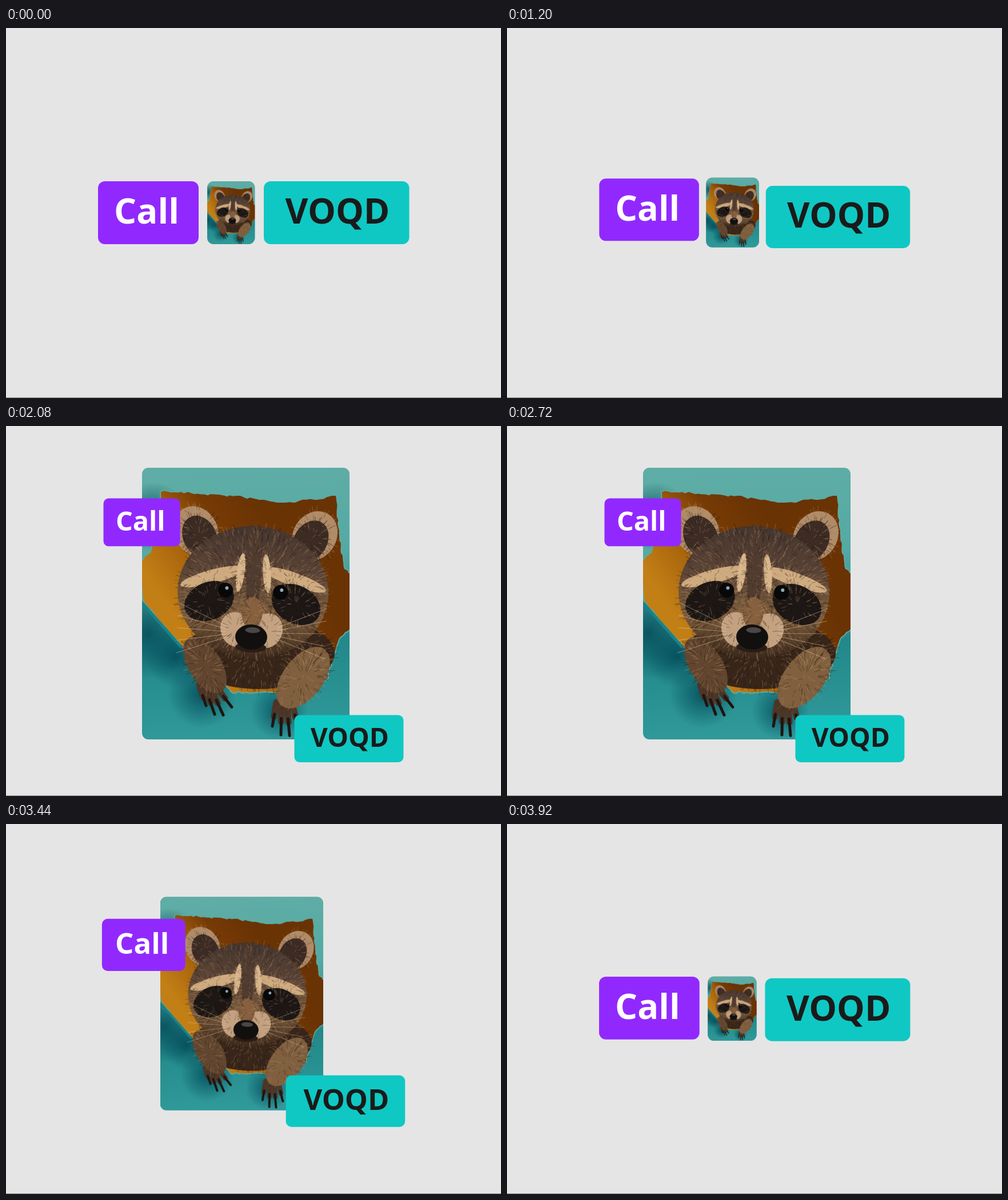
These frames come from a looping animation (866x647 px, 4000 ms). An HTML page with a canvas:

```html
<!DOCTYPE html>
<html lang="en">
<head>
<meta charset="utf-8">
<title>Call VOQD</title>
<style>
html, body { margin: 0; width: 100%; height: 100%; overflow: hidden; background: #e5e5e5; }
canvas { display: block; }
</style>
</head>
<body>
<canvas id="stage" width="866" height="647"></canvas>
<script>
const LOOP = 4000;
const stage = document.getElementById('stage').getContext('2d');
const photo = document.createElement('canvas');
photo.width = 363;
photo.height = 475;
const ctx = photo.getContext('2d');

const mix = (a, b, p) => a + (b - a) * p;
const clamp = v => Math.min(1, Math.max(0, v));
let seed = 7;
const random = () => (seed = seed * 16807 % 2147483647) / 2147483647;

// Opening ease: cubic-bezier(.65, 0, .35, 1)
function easeOpen(u) {
  let lo = 0, hi = 1;
  for (let i = 0; i < 24; i++) {
    const s = (lo + hi) / 2, r = 1 - s;
    if (1.95 * r * r * s + 1.05 * r * s * s + s ** 3 < u) lo = s; else hi = s;
  }
  return lo * lo * (3 - 2 * lo);
}
const easeClose = u => u < .5 ? 4 * u ** 3 : 1 - 4 * (1 - u) ** 3;
const progress = t => easeOpen(clamp((t - 1030) / 937)) - easeClose(clamp((t - 3016) / 1034));

function gradient(x0, y0, x1, y1, ...colors) {
  const g = ctx.createLinearGradient(x0, y0, x1, y1);
  colors.forEach((c, i) => g.addColorStop(i / (colors.length - 1), c));
  return g;
}

function shadow(x, y, r) {
  const g = ctx.createRadialGradient(x, y, 0, x, y, r);
  g.addColorStop(0, 'rgba(0,70,85,.8)');
  g.addColorStop(1, 'rgba(0,70,85,0)');
  oval(g, x, y, r, r);
}

function oval(fill, x, y, rx, ry, tilt = 0) {
  ctx.beginPath();
  ctx.ellipse(x, y, rx, ry, tilt, 0, 7);
  ctx.fillStyle = fill;
  ctx.fill();
}

function line(color, width, x0, y0, x1, y1) {
  ctx.beginPath();
  ctx.moveTo(x0, y0);
  ctx.lineTo(x1, y1);
  ctx.strokeStyle = color;
  ctx.lineWidth = width;
  ctx.stroke();
}

// Oval with hairs running outwards from its centre
function fur(color, x, y, rx, ry, tilt = 0) {
  const hairs = [color, color, '#1d120c', '#c29a70'];
  oval(color, x, y, rx, ry, tilt);
  ctx.save();
  ctx.translate(x, y);
  ctx.rotate(tilt);
  ctx.globalAlpha = .3;
  for (let i = 0; i < 60 + rx * ry / 10; i++) {
    const a = random() * 2 * Math.PI, r = Math.sqrt(random());
    const hx = Math.cos(a), hy = Math.sin(a), len = 4 + 8 * random();
    const px = hx * rx * r, py = hy * ry * r;
    line(hairs[i % 4], 1.3, px, py, px + hx * len, py + hy * len);
  }
  ctx.restore();
}

function tornHole(...corners) {
  ctx.beginPath();
  corners.forEach(([x, y], i) => {
    const [nx, ny] = corners[(i + 1) % corners.length];
    const steps = Math.ceil(Math.hypot(nx - x, ny - y) / 6);
    for (let k = 0; k < steps; k++) {
      ctx.lineTo(mix(x, nx, k / steps) + 3 * random() - 1, mix(y, ny, k / steps) + 4 * random() - 2);
    }
  });
  ctx.closePath();
  ctx.fillStyle = gradient(30, 220, 220, 90, '#c27f16', '#a8640b', '#763a05', '#6a3304');
  ctx.fill();
  ctx.strokeStyle = '#5fa9a2';
  ctx.lineWidth = 2;
  ctx.stroke();
}

function paw(x, y, tipX, tipY) {
  for (let i = 0; i < 4; i++) {
    const tx = tipX + 15 * i, ty = tipY + 18 * Math.sin(i);
    line('#4c3526', 11, x + 9 * i, y, mix(x + 9 * i, tx, .6), mix(y, ty, .6));
    line('#1d1512', 5, mix(x + 9 * i, tx, .5), mix(y, ty, .5), tx, ty);
  }
}

// Face coordinates start at the nose; each side is a mirror image
function eachSide(drawSide) {
  for (const side of [-1, 1]) {
    ctx.save();
    ctx.scale(side, 1);
    drawSide(side);
    ctx.restore();
  }
}

function drawFace() {
  eachSide(() => {
    fur('#b08b68', 104, -181, 38, 45, .5);
    fur('#3d2c24', 97, -172, 29, 38, .5);
  });
  fur(gradient(0, -198, 0, 38, '#43342d', '#574135', '#80603f', '#3b281b'), 0, -78, 132, 116);
  eachSide(() => {
    fur('#cfab80', 72, -103, 58, 12, .3);
    fur('#d9b78c', 23, -112, 7, 34, -.1);
    fur('#1d1715', 76, -60, 45, 33, .45);
    fur('#c4a281', 27, -12, 27, 31, .4);
  });
  fur('#513c30', 0, -110, 13, 78);
  fur('#87603f', 0, -42, 18, 28);
  oval('#2b1d16', 0, 18, 27, 9);
  oval('#12100f', 0, 0, 28, 22);
  oval('#4b4747', 2, -12, 13, 5);
  eachSide(side => {
    oval('#080808', 48, -80, 13, 13);
    oval('#8faab3', 48 + 2 * side, -84, 3, 3);
    for (let i = 0; i < 5; i++) line('rgba(235,210,175,.45)', 1, 45, i * 5 - 18, 130, i * 22 - 55);
  });
}

function paintPhoto() {
  ctx.fillStyle = gradient(60, 0, 90, 475, '#5fada6', '#54aaa3', '#22888a', '#30999a');
  ctx.fillRect(0, 0, 363, 475);
  shadow(20, 85, 60);
  shadow(10, 290, 80);
  shadow(60, 330, 55);
  shadow(105, 395, 60);
  shadow(240, 425, 50);
  tornHole([33, 40], [165, 49], [247, 61], [339, 49], [352, 172], [368, 190], [365, 282], [343, 300],
    [324, 368], [292, 391], [157, 393], [68, 312], [0, 234], [-5, 168], [14, 147]);
  line('#17838c', 5, 0, 236, 69, 314);

  fur('#38261a', 205, 325, 132, 62);
  ctx.lineCap = 'round';
  paw(100, 380, 112, 416);
  paw(235, 410, 228, 452);
  fur('#62462f', 110, 345, 29, 55, -.55);
  fur('#80603f', 282, 367, 35, 62, .65);
  ctx.lineCap = 'butt';

  ctx.translate(191, 296);
  ctx.rotate(.04);
  drawFace();
}

function drawPhoto(p) {
  const x = mix(352, 238, p), y = mix(268, 73, p);
  const w = mix(83.5, 363, p), h = mix(110, 475, p);
  stage.save();
  stage.beginPath();
  stage.roundRect(x, y, w, h, 11);
  stage.clip();
  stage.imageSmoothingQuality = 'high';
  stage.drawImage(photo, x, y, w, h);
  stage.restore();
}

function drawCard(text, fill, ink, width, center, x, y, scale) {
  stage.save();
  stage.translate(x, y);
  stage.scale(scale, scale);
  stage.beginPath();
  stage.roundRect(0, 0, width, 110, 12);
  stage.fillStyle = fill;
  stage.fill();
  stage.font = '700 61.5px "Open Sans", "Noto Sans", sans-serif';
  stage.textAlign = 'center';
  stage.fillStyle = ink;
  stage.fillText(text, center, 74);
  stage.restore();
}

function draw(now) {
  const p = progress(now % LOOP);
  stage.fillStyle = '#e5e5e5';
  stage.fillRect(0, 0, 866, 647);
  stage.fillStyle = '#858182';
  stage.fillRect(0, 646, 866, 1);
  drawPhoto(p);
  drawCard('Call', '#9129ff', '#fff', 176, 85, mix(161, 170.5, p), mix(268, 126.5, p), mix(1, .762, p));
  drawCard('VOQD', '#0fc8c3', '#1a1a1a', 254.5, 129, mix(451, 504.5, p), mix(268, 505.5, p), mix(1, .75, p));
  requestAnimationFrame(draw);
}

paintPhoto();
requestAnimationFrame(draw);
</script>
</body>
</html>
```
